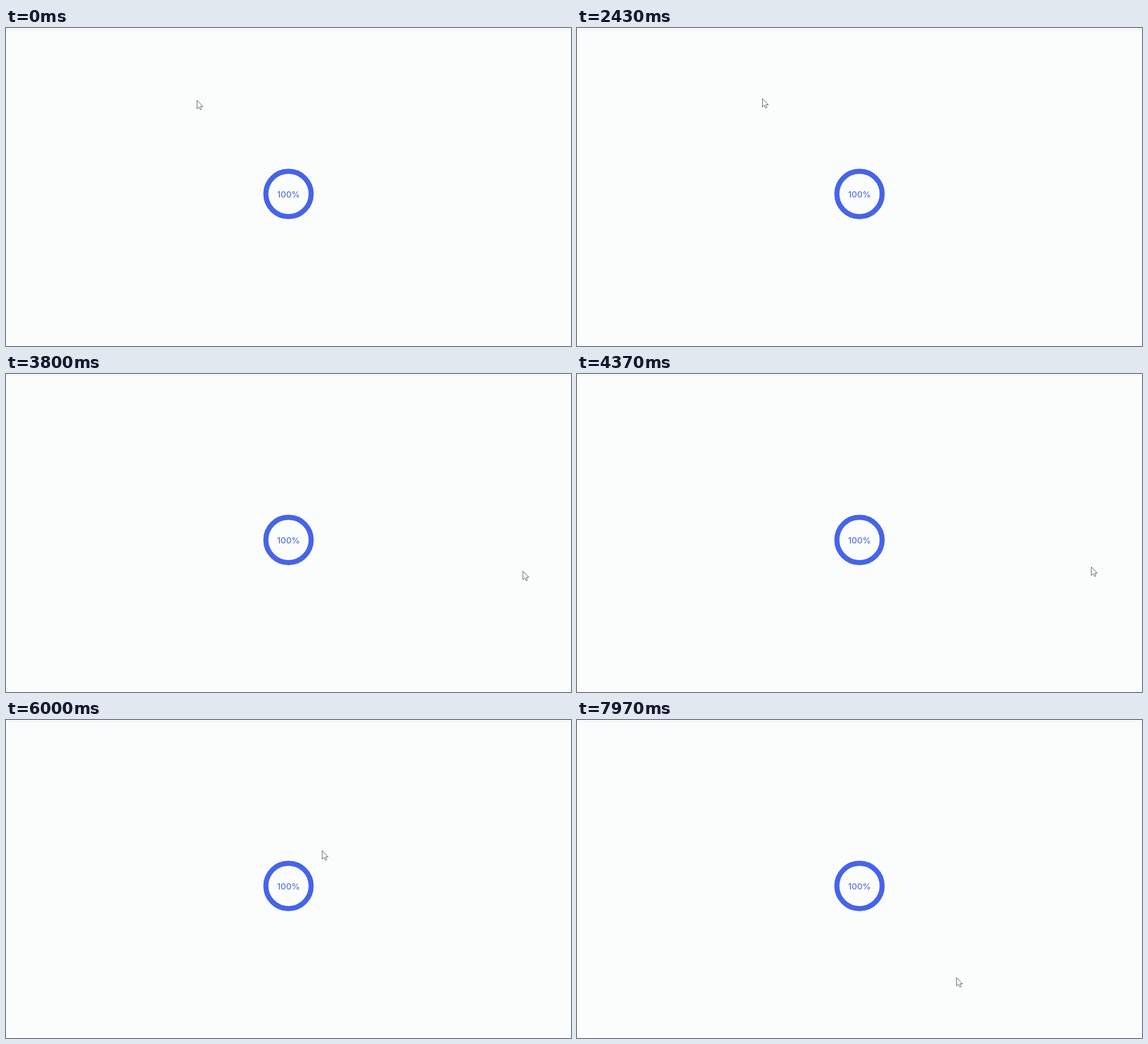
Animation of 998x561 px, one loop 8000 ms. Source, as an HTML page with a canvas:

```html
<!DOCTYPE html>
<html lang="en">
<head>
<meta charset="utf-8">
<title>Progress ring</title>
<style>
  html, body { margin: 0; width: 100%; height: 100%; overflow: hidden; background: #fbfdfd; }
  canvas { display: block; width: 998px; height: 561px; }
</style>
</head>
<body>
<canvas id="stage" width="998" height="561"></canvas>
<script>
const ctx = document.getElementById('stage').getContext('2d');
const LOOP = 8000;
const TAU = Math.PI * 2;

// Key positions of the pointer tip
const stops = [
  { t: 0, x: 337, y: 127 },
  { t: 2430, x: 327, y: 124 },
  { t: 2600, x: 327, y: 124 },
  { t: 3130, x: 796, y: 173 },
  { t: 3900, x: 915, y: 354 },
  { t: 4370, x: 908, y: 340 },
  { t: 5100, x: 495, y: 245 },
  { t: 6000, x: 558, y: 230 },
  { t: 7970, x: 670, y: 454 }
];

const arrow = new Path2D('M0 0V15L3.5 11.8L5.8 16.8L8.1 15.8L5.9 11H10.4Z');

// Speed through a stop: zero at turning points, else the harmonic mean
function speed(i, axis) {
  const a = stops[i - 1], b = stops[i], c = stops[i + 1];
  if (!a || !c) return 0;
  const before = (b[axis] - a[axis]) / (b.t - a.t);
  const after = (c[axis] - b[axis]) / (c.t - b.t);
  return before * after > 0 ? 2 * before * after / (before + after) : 0;
}

function glide(t, axis) {
  const next = stops.findIndex(s => s.t > t);
  if (next < 0) return stops[stops.length - 1][axis];
  const a = stops[next - 1], b = stops[next], span = b.t - a.t;
  const u = (t - a.t) / span, v = 1 - u;
  return a[axis] * v * v * (1 + 2 * u) + b[axis] * u * u * (1 + 2 * v) +
    span * u * v * (speed(next - 1, axis) * v - speed(next, axis) * u);
}

function drawPage() {
  ctx.fillStyle = '#fbfdfd';
  ctx.fillRect(0, 0, 998, 561);
  ctx.fillStyle = '#eeeff1';
  ctx.fillRect(0, 2, 998, 1);
}

function drawRing() {
  ctx.beginPath();
  ctx.arc(499, 292.7, 40, 0, TAU);
  ctx.lineWidth = 9;
  ctx.strokeStyle = '#4664e9';
  ctx.stroke();
  ctx.font = '500 15px Inter, sans-serif';
  ctx.textAlign = 'center';
  ctx.fillStyle = '#5a72dc';
  ctx.fillText('100%', 499, 299);
}

function drawPointer(x, y) {
  ctx.save();
  ctx.translate(x + 0.5, y + 0.5);
  ctx.fillStyle = '#fff';
  ctx.fill(arrow);
  ctx.lineWidth = 1;
  ctx.lineJoin = 'round';
  ctx.strokeStyle = '#555b64';
  ctx.stroke(arrow);
  ctx.restore();
}

function draw(now) {
  const t = now % LOOP;
  drawPage();
  drawRing();
  drawPointer(glide(t, 'x'), glide(t, 'y'));
  requestAnimationFrame(draw);
}

draw(0);
</script>
</body>
</html>
```
